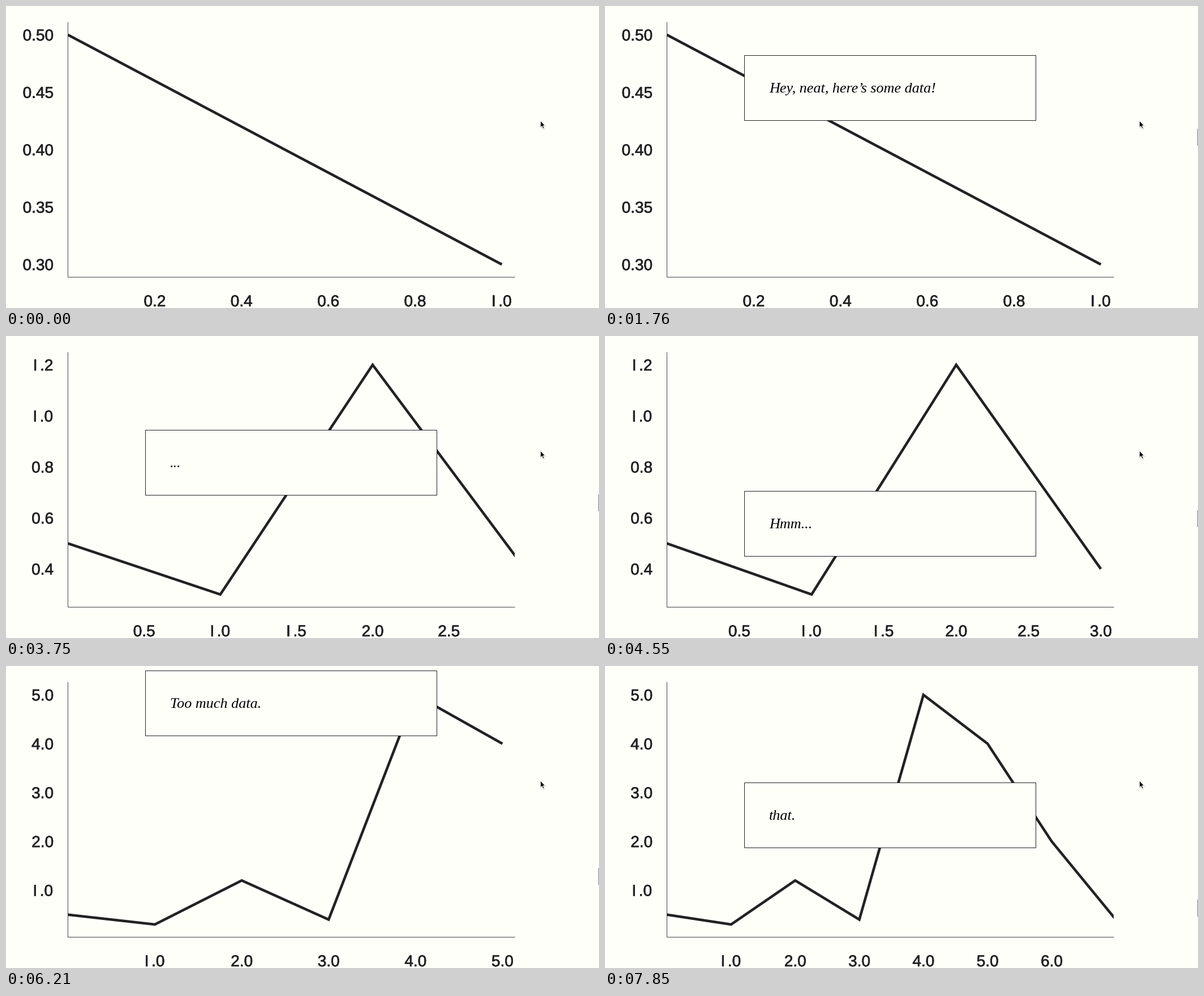
A matplotlib script for the animation above (8 s loop, 1048 by 534 pixels).

```python
import math

import numpy as np
import matplotlib.pyplot as plt
from matplotlib.animation import FuncAnimation
from matplotlib.patches import Polygon, Rectangle
from matplotlib.patheffects import withStroke

W, H, DPI = 1048, 534, 100
PX = 72 / DPI                      # points per pixel
LOOP, INTERVAL = 8000, 40
PAPER, INK = "#fefff9", "#222222"

# chart area, and the pixel span that the data range fills
LEFT, RIGHT, TOP, BOTTOM = 109.5, 899, 28, 479
DATA_RIGHT, DATA_TOP, DATA_BOTTOM = 876.3, 51, 457

VALUES = np.array([0.5, 0.3, 1.2, 0.4, 5, 4, 2, 0.4])
NOTES = ["Hey, neat, here\u2019s some data!", "...", "...", "Hmm...",
         "Too much data.", "Stop.", "that."]
BOX_GAP, BOX_H = 600, 115
TRIGGER = 267                      # a note adds a point when it reaches mid-screen
TAU = 90                           # ms, easing of the axis ranges

# the page scrolls in uneven flicks: (ms, px)
SCROLL_T, SCROLL_Y = np.transpose([
    (660, -520), (1760, -86), (2618, 333), (2700, 419), (4550, 1527),
    (5570, 2132), (6615, 2733), (6930, 2897), (7719, 3333), (7850, 3395)])

# the picture is refreshed in slowly lengthening steps
STEPS = np.interp(np.arange(38), [0, 7, 13, 22, 27, 33, 37],
                  [660, 1760, 2700, 4550, 5570, 6930, 7850])

# when each later point joins, and how far the top of the range grows with it
JOINS = np.interp(BOX_GAP * np.arange(1, len(NOTES)) - TRIGGER, SCROLL_Y, SCROLL_T)
GROWTH = np.diff(np.maximum.accumulate(VALUES)[1:])

fig = plt.figure(figsize=(W / DPI, H / DPI), dpi=DPI, facecolor=PAPER)
ax = fig.add_axes([0, 0, 1, 1])
ax.set_xlim(0, W)
ax.set_ylim(H, 0)
ax.axis("off")


def label(ha):
    return ax.text(0, 0, "", family="Liberation Sans", fontsize=28 * PX,
                   color=INK, ha=ha, va="baseline", zorder=2,
                   path_effects=[withStroke(linewidth=0.7 * PX, foreground=INK)])


def make_note(text):
    box = Rectangle((246, H), 515, BOX_H, facecolor=PAPER, edgecolor=INK,
                    linewidth=PX, zorder=4)
    ax.add_patch(box)
    words = ax.text(290, H, text, family="Liberation Serif", style="italic",
                    fontsize=26.1 * PX, color="black", va="baseline", zorder=5)
    return box, words


ax.plot([109, 109, RIGHT], [TOP, BOTTOM, BOTTOM], color="#444444", lw=PX,
        solid_joinstyle="miter", solid_capstyle="butt", snap=True, zorder=1)
curve, = ax.plot([], [], color=INK, lw=4.6 * PX, solid_joinstyle="miter",
                 solid_capstyle="butt", zorder=3)
curve.set_clip_path(Rectangle((LEFT - 0.5, TOP), RIGHT - LEFT + 0.5, BOTTOM - TOP,
                              transform=ax.transData))
x_labels = [label("center") for _ in range(14)]
y_labels = [label("right") for _ in range(14)]
notes = [make_note(text) for text in NOTES]
thumb = ax.add_patch(Rectangle((1047, 0), 1, 30, color="#777777", lw=0, zorder=6))

ARROW = np.array([(0, 0), (0, 11.8), (2.7, 9.4), (4.6, 13.8), (6.6, 13),
                  (4.7, 8.7), (8.2, 8.5)]) + (944.6, 203)
ax.add_patch(Polygon(ARROW + (0.4, 1), facecolor="#00000022", edgecolor="#00000018",
                     lw=2.4 * PX, zorder=7))
ax.add_patch(Polygon(ARROW, facecolor="black", edgecolor="white", lw=0.9 * PX, zorder=8))


def ticks(lo, hi):
    """Round tick values, about five in the range, with their texts."""
    raw = (hi - lo) / 5
    power = 10.0 ** math.floor(math.log10(raw))
    step = power * next((m for m in (10, 5, 2) if raw / power >= math.sqrt(m * m / 2)), 1)
    digits = max(math.floor(-math.log10(step) + 1e-9), 0) + 1
    first, last = math.ceil(lo / step - 1e-9), math.floor(hi / step + 1e-9)
    return [(n * step, f"{n * step:.{digits}f}") for n in range(first, last + 1)]


def fill(pool, items):
    for text in pool:
        text.set_text("")
    for text, (x, y, words) in zip(pool, items):
        text.set_position((x, y))
        text.set_text(words.replace("1", r"I$\,$"))     # the figure one is a plain bar


def draw_chart(t):
    eased = 1 - np.exp(-np.clip(t - JOINS, 0, None) / TAU)
    low, peak = VALUES.min(), VALUES[0] + eased @ GROWTH
    x_unit = (DATA_RIGHT - LEFT) / (1 + eased.sum())
    y_unit = (DATA_BOTTOM - DATA_TOP) / (peak - low)

    def to_y(v):
        return DATA_BOTTOM - (v - low) * y_unit

    count = 2 + int((t > JOINS).sum())
    curve.set_data(LEFT + np.arange(count) * x_unit, to_y(VALUES[:count]))

    xs = ticks(0, (RIGHT - LEFT) / x_unit)[1:]
    fill(x_labels, [(LEFT + v * x_unit, 531, s) for v, s in xs])
    ys = ticks(low - (BOTTOM - DATA_BOTTOM) / y_unit, low + (DATA_BOTTOM - TOP) / y_unit)
    fill(y_labels, [(84, to_y(v) + 10, s) for v, s in ys])


def draw(frame):
    now = frame * INTERVAL + INTERVAL - 1
    started = now >= STEPS[0]
    t = STEPS[STEPS <= now][-1] if started else 0
    scroll = np.interp(t, SCROLL_T, SCROLL_Y)
    draw_chart(t)
    for i, (box, words) in enumerate(notes):
        y = round(BOX_GAP * i - scroll)
        visible = started and -BOX_H - 2 < y < H
        box.set_visible(visible)
        words.set_visible(visible)
        box.set_y(y + 1)
        words.set_y(y + 67)
    thumb.set_visible(started)
    thumb.set_y(round(217 + (scroll + 86) * 0.0563))
    return []


anim = FuncAnimation(fig, draw, frames=LOOP // INTERVAL, interval=INTERVAL,
                     init_func=lambda: draw(0), repeat=True, repeat_delay=0)
plt.show()
```
